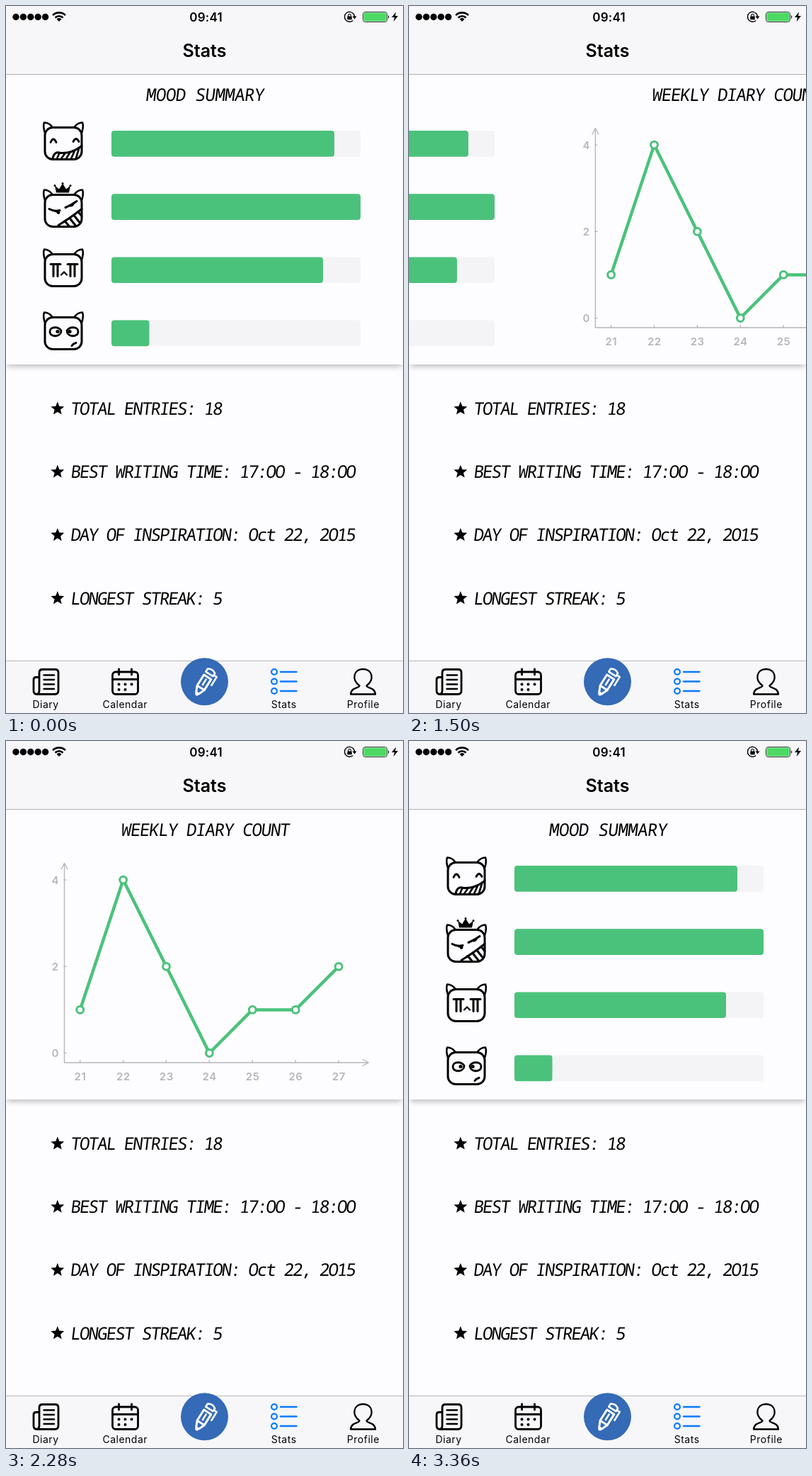
An HTML page with a canvas for the animation above (3.48 s loop, 561 by 998 pixels).

```html
<!DOCTYPE html>
<html lang="en">
<head>
<meta charset="utf-8">
<title>Stats</title>
<style>
html, body { margin: 0; width: 100%; height: 100%; overflow: hidden; background: #fdfcff; }
canvas { display: block; }
</style>
</head>
<body>
<canvas id="stage" width="561" height="998"></canvas>
<script>
const W = 561, H = 998, LOOP = 3480, STEP = 30;
const SLIDE_STARTS = [1272, 2292], SLIDE_TIME = 575;
const PAPER = '#fdfcff', BAR = '#f7f6f9', GREEN = '#4bc27b', GRAY = '#b7b5ba', BLUE = '#0a7aff';
const ctx = document.getElementById('stage').getContext('2d');

function stroke(d, width = 3, color = '#000') {
  ctx.strokeStyle = color;
  ctx.lineWidth = width;
  ctx.stroke(new Path2D(d));
}

function fill(d, color = '#000') {
  ctx.fillStyle = color;
  ctx.fill(new Path2D(d));
}

function dot(x, y, r, color = '#000') {
  ctx.beginPath();
  ctx.arc(x, y, r, 0, Math.PI * 2);
  ctx.fillStyle = color;
  ctx.fill();
}

function ring(x, y, r, width, color, inside) {
  if (inside) dot(x, y, r, inside);
  ctx.beginPath();
  ctx.arc(x, y, r, 0, Math.PI * 2);
  ctx.strokeStyle = color;
  ctx.lineWidth = width;
  ctx.stroke();
}

function box(x, y, w, h, r, color) {
  ctx.beginPath();
  ctx.roundRect(x, y, w, h, r);
  ctx.fillStyle = color;
  ctx.fill();
}

function frame(x, y, w, h, r, width, color = '#000') {
  ctx.beginPath();
  ctx.roundRect(x, y, w, h, r);
  ctx.strokeStyle = color;
  ctx.lineWidth = width;
  ctx.stroke();
}

function label(text, x, y, size, weight, color = '#000', spacing = 0) {
  ctx.font = `${weight} ${size}px Inter, Roboto, sans-serif`;
  ctx.letterSpacing = spacing + 'px';
  ctx.textAlign = 'center';
  ctx.fillStyle = color;
  ctx.fillText(text, x + spacing / 2, y);
}

// Thin slanted lettering on an even pitch, with plain zeros.
function handwriting(text, x, y, pitch) {
  ctx.save();
  ctx.translate(x, y);
  ctx.transform(1, 0, -0.12, 1, 0, 0);
  ctx.font = "100 extra-condensed 24.5px 'Noto Sans Mono', 'DejaVu Sans Mono', monospace";
  ctx.letterSpacing = '0px';
  const gap = pitch - ctx.measureText('M').width;
  ctx.letterSpacing = gap + 'px';
  ctx.textAlign = 'left';
  ctx.fillStyle = '#000';
  ctx.fillText(text.replaceAll('0', 'O'), Math.max(0, gap / 2), 0);
  ctx.restore();
}

function heading(text, pitch) {
  handwriting(text, 280.5 - text.length * pitch / 2, 134, pitch);
}

function star(x, y) {
  ctx.beginPath();
  for (let i = 0; i < 10; i++) {
    const r = i % 2 ? 4.4 : 10, a = i * Math.PI / 5;
    ctx.lineTo(x + r * Math.sin(a), y - r * Math.cos(a));
  }
  ctx.fillStyle = '#000';
  ctx.fill();
}

// Faces are drawn around the middle of the head.
const FACES = [
  () => {
    stroke('M-18 -1Q-14 -10 -10 -1M14 -2Q18 -10 22 -2', 2.8);
    stroke('M-15 22Q-13 11 -4 14Q12 15 26 4', 3);
    stroke('M-6 15L-9 22M2 15L-3 22M9 14L4 22M16 11L11 22M22 8L18 21', 2.6);
  },
  () => {
    fill('M-10 -25L-12 -35L-6 -30L-1 -38L4 -30L10 -35L8 -25Z');
    for (const [x, y] of [[-12, -35], [-1, -38], [10, -35]]) dot(x, y, 1.5);
    stroke('M-20 -2Q-13 2 -5 0M3 -4Q10 -7 19 -13', 3);
    fill('M-15 -1L-6 1Q-10 6 -15 -1ZM7 -6L16 -10Q14 -3 7 -6Z');
    dot(-7, 3, 2.4);
    stroke('M-7 21Q8 12 26 -2', 3);
    stroke('M2 15L8 22M9 11L17 21M15 7L23 17M21 2L26 8', 3);
  },
  () => {
    stroke('M-18 -8H-4M-14 -7V9M-8 -7V9M6 -8H20M10 -7V9M16 -7V9', 3);
    stroke('M-3 7L1 3L5 7', 2.4);
  },
  () => {
    stroke('M-19 -2C-19 -10 -5 -9 -3 -3C-3 6 -19 7 -19 -2ZM21 -2C21 -10 7 -9 5 -3C5 6 21 7 21 -2Z', 2.8);
    dot(-8, -2, 2.6);
    dot(9, -2, 2.6);
    stroke('M12 18Q14 15 18 14', 3);
  }
];

function head(y, drawFace) {
  ctx.save();
  ctx.translate(81, y);
  stroke('M-26 -14Q-29 -24 -27 -29Q-20 -29 -15 -22M26 -14Q29 -24 27 -29Q20 -29 15 -22', 2.6);
  frame(-26, -22, 52, 45, 11, 3);
  drawFace();
  ctx.restore();
}

function moodPage() {
  heading('MOOD SUMMARY', 13.9);
  const heads = [193.5, 288.5, 372.5, 461.5], widths = [315, 352, 299, 53.5];
  heads.forEach((y, i) => {
    head(y, FACES[i]);
    const top = 176 + 89.2 * i;
    box(149, top, 352, 36.7, 4, '#f4f3f5');
    box(149, top, widths[i], 36.7, 4, GREEN);
  });
}

function chartPage() {
  heading('WEEKLY DIARY COUNT', 13.2);
  stroke('M82.5 173V454H512M78 181L82.5 172.5L87 181M504 449.5L512.5 454L504 458.5', 1.4, GRAY);
  const px = i => 104.7 + 60.9 * i, py = v => 440.5 - 61.1 * v;
  for (const v of [0, 2, 4]) {
    stroke(`M82 ${py(v)}h3`, 1.4, GRAY);
    label(v, 69.5, py(v) + 5.5, 15, 600, GRAY);
  }
  const counts = [1, 4, 2, 0, 1, 1, 2];
  counts.forEach((v, i) => {
    stroke(`M${px(i)} 454v-3`, 1.4, GRAY);
    label(21 + i, px(i), 478.5, 15, 600, GRAY, 0.5);
  });
  stroke('M' + counts.map((v, i) => `${px(i)} ${py(v)}`).join('L'), 4.5, GREEN);
  counts.forEach((v, i) => ring(px(i), py(v), 4.9, 3, GREEN, '#fff'));
}

function statusBar() {
  for (let i = 0; i < 5; i++) dot(14 + 10.4 * i, 15.5, 4.7);
  ctx.lineCap = 'butt';
  for (const r of [12.6, 7.8]) {
    ctx.beginPath();
    ctx.arc(75, 22, r, -Math.PI * 0.75, -Math.PI * 0.25);
    ctx.strokeStyle = '#000';
    ctx.lineWidth = 2.6;
    ctx.stroke();
  }
  ctx.lineCap = 'round';
  fill('M75 22L71.6 18.4Q75 15.8 78.4 18.4Z');
  label('09:41', 282.5, 21.5, 17, 600, '#000', 0.2);
  ctx.beginPath();
  ctx.arc(485.5, 15.3, 7, 0.9, Math.PI * 2);
  ctx.lineWidth = 1.4;
  ctx.stroke();
  fill('M489.5 14.5H495.5L492.5 18.5Z');
  box(482.3, 14.5, 6.4, 4.8, 0.5, '#000');
  stroke('M483.7 14.5V13A1.8 1.8 0 0 1 487.3 13V14.5', 1.1);
  frame(504.5, 8.5, 34, 14, 3, 1, '#333');
  box(505.5, 9.5, 32, 12, 2, '#4cd964');
  fill('M540 13Q542.5 15.5 540 18Z');
  fill('M551 8.5L545 16H549L547.5 22L554 14H550Z');
}

function navBar() {
  box(0, 0, W, 96, 0, BAR);
  box(0, 96, W, 1, 0, '#b2b1b4');
  statusBar();
  label('Stats', 280.5, 72, 25, 600);
}

function penButton() {
  dot(280.5, 953.8, 33.5, '#346ab6');
  ctx.save();
  ctx.translate(280.5, 954);
  ctx.rotate(0.56);
  stroke('M-6 -8V10L-2 19H2L6 10V-8ZM-6 10H6', 3, '#fff');
  stroke('M-6 -13H6V-18Q0 -22 -6 -18Z', 2.6, '#fff');
  stroke('M0 -4V5M7 -15H11V-1', 2.6, '#fff');
  dot(0, 20, 2.6, '#fff');
  ctx.restore();
}

function tabBar() {
  box(0, 924, W, 74, 0, BAR);
  box(0, 924, W, 1, 0, '#b8b7ba');
  stroke('M47 965V941Q47 936.5 51.5 936.5H69.5Q74 936.5 74 941V966.5Q74 971.5 69 971.5H43.5Q39 971.5 39 966.5V951Q39 947.5 42.5 947.5H47V966Q47 971.5 43 971.5', 2.8);
  stroke('M53.5 944.5H68M53.5 951H68M53.5 957.5H68M53.5 964H68', 2.4);

  frame(150.5, 940, 36, 31.5, 4.5, 2.8);
  stroke('M151 950.5H186M159.5 936V944M177.5 936V944', 2.8);
  for (const [x, y] of [[159.5, 957.5], [168.5, 957.5], [177.5, 957.5], [159.5, 965], [168.5, 965]]) dot(x, y, 2);

  penButton();

  for (const y of [940, 953.5, 967]) {
    ring(379, y, 3.9, 2.2, BLUE);
    stroke(`M388 ${y}H410.5`, 2.4, BLUE);
  }

  stroke('M499.5 959.5C488 951 491 936 504.5 936C518 936 521 951 509.5 959.5C509 963 521 961 522 971.5H487C488 961 500 963 499.5 959.5Z', 2.3);

  ['Diary', 'Calendar', '', 'Stats', 'Profile'].forEach((name, i) => {
    label(name, 55.8 + 112.2 * i, 990.5, 14, 400, '#000', 0.5);
  });
}

function facts() {
  const lines = ['TOTAL ENTRIES: 18', 'BEST WRITING TIME: 17:00 - 18:00',
    'DAY OF INSPIRATION: Oct 22, 2015', 'LONGEST STREAK: 5'];
  lines.forEach((text, i) => {
    const y = 568.5 + 89.2 * i;
    star(72.8, y);
    handwriting(text, 90.5, y + 8.5, 12.55);
  });
}

function card() {
  ctx.save();
  ctx.shadowColor = 'rgba(0,0,0,0.26)';
  ctx.shadowBlur = 8;
  ctx.shadowOffsetY = 3;
  box(2, 97, W - 4, 409, 0, PAPER);
  ctx.restore();
  box(0, 97, W, 409, 0, PAPER);
}

// Quick start, long settle: a cubic Bezier through (.25,.1) and (.25,1).
function ease(x) {
  if (x <= 0) return 0;
  if (x >= 1) return 1;
  let lo = 0, hi = 1;
  for (let i = 0; i < 24; i++) {
    const p = (lo + hi) / 2;
    if (0.75 * p * (1 - p) + p ** 3 < x) lo = p; else hi = p;
  }
  const q = 1 - lo;
  return 0.3 * q * q * lo + 3 * q * lo * lo + lo ** 3;
}

function draw(time) {
  const scroll = W * SLIDE_STARTS.reduce((sum, start) => sum + ease((time - start) / SLIDE_TIME), 0);
  ctx.lineCap = ctx.lineJoin = 'round';
  box(0, 0, W, H, 0, PAPER);
  card();
  [moodPage, chartPage, moodPage].forEach((page, i) => {
    const x = i * W - scroll;
    if (Math.abs(x) >= W) return;
    ctx.save();
    ctx.translate(x, 0);
    page();
    ctx.restore();
  });
  facts();
  navBar();
  tabBar();
}

const begin = performance.now();
function tick() {
  const time = (performance.now() - begin) % LOOP;
  draw(Math.floor(time / STEP) * STEP);
  requestAnimationFrame(tick);
}
tick();
</script>
</body>
</html>
```
